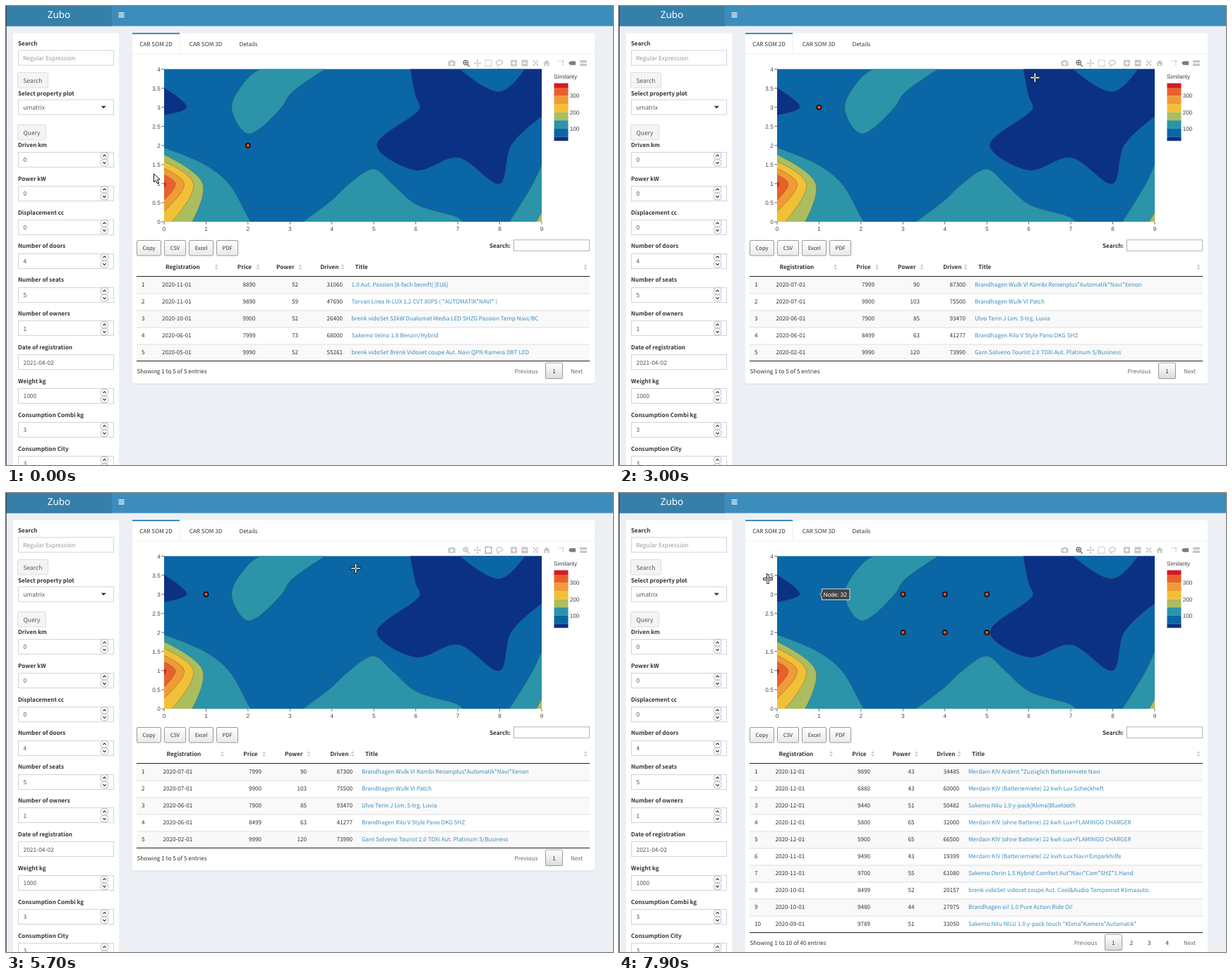
An HTML page that plays this animation: 860 px wide and 651 px high, repeating every 8000 ms.

```html
<!DOCTYPE html>
<html lang="en">
<head>
<meta charset="utf-8">
<title>Car map dashboard</title>
<style>
html, body { margin: 0; height: 100%; overflow: hidden; background: #ecf0f5; }
svg { display: block; }
text { font: 8.13px "Noto Sans CJK JP", "Noto Sans CJK SC", "Noto Sans CJK", "Open Sans", sans-serif;
  fill: #333; text-rendering: geometricPrecision; white-space: pre; }
.bold { font-weight: 700; }
.mid { text-anchor: middle; }
.end { text-anchor: end; }
.input { font-size: 8.45px; fill: #555; }
.hint { fill: #999; }
.button { font-size: 7.5px; }
.link { fill: #3c8dbc; }
.muted { fill: #666; }
.plot { font: 8.2px "Liberation Sans", Arial, sans-serif; fill: #444; }
.light { fill: #fff; }
.brand { font: 13.5px "Noto Sans", sans-serif; fill: #fff; }
</style>
</head>
<body>
<svg id="stage" width="860" height="651" viewBox="0 0 860 651"></svg>
<script>
const LOOP = 8000, STEP = 100;
const text = (x, y, s, cls = "") =>
  `<text x="${x}" y="${y}" class="${cls}">${String(s).replace(/&/g, "&amp;")}</text>`;
const rect = (x, y, w, h, fill, extra = "") =>
  `<rect x="${x}" y="${y}" width="${w}" height="${h}" fill="${fill}" ${extra}/>`;
const path = (d, fill, extra = "") => `<path d="${d}" fill="${fill}" ${extra}/>`;
const at = (x, y, s, extra = "") => `<g transform="translate(${x} ${y})" ${extra}>${s}</g>`;
const range = n => [...Array(n).keys()];
const px = x => 224 + x * 59.44;
const py = y => 306 - y * 54.1;

// ---------- page and sidebar ----------
const field = y => rect(17.5, y, 135, 21, "#fff", 'stroke="#cfd4da"');
const greyButton = (y, w, s) =>
  rect(16.5, y, w, 21.5, "#f4f4f4", 'rx="2" stroke="#ddd"') + text(16.5 + w / 2, y + 14, s, "mid input");

const spinner = at(139.5, 0, [-1, 1].map(d =>
  rect(-5.3, d < 0 ? -9.7 : .3, 10.6, 9.4, "#fff", 'rx="4" stroke="#aaa" stroke-width=".8"') +
  path(`M-2.2 ${d * 4}L0 ${d * 6.2}L2.2 ${d * 4}`, "none", 'stroke="#333" stroke-width="1.2"')).join(""));

const numbers = [["Driven km", 0], ["Power kW", 0], ["Displacement cc", 0], ["Number of doors", 4],
  ["Number of seats", 5], ["Number of owners", 1], ["Date of registration", "2021-04-02"],
  ["Weight kg", 1000], ["Consumption Combi kg", 3], ["Consumption City", 3]];

const page =
  rect(0, 0, 860, 651, "#ecf0f5") +
  rect(0, 0, 860, 28.5, "#3c8dbc") + rect(0, 0, 150, 28.5, "#367fa9") +
  text(75, 16.5, "Zubo", "brand mid") +
  [9.2, 12, 14.8].map(y => rect(159.5, y, 8, 1.4, "#fff")).join("") +
  rect(10, 39, 150, 620, "#d8dce1", 'rx="2"') + rect(10, 38.5, 150, 620, "#fff", 'rx="2"') +
  text(17, 56.3, "Search", "bold") + field(63) + text(24, 77, "Regular Expression", "input hint") +
  greyButton(94.5, 43, "Search") +
  text(17, 126.5, "Select property plot", "bold") + field(133) + text(24.5, 147, "umatrix", "input") +
  path("M134.7 141.7h7l-3.5 3.7z", "#333") +
  greyButton(168.5, 40, "Query") +
  numbers.map(([label, value], i) => {
    const y = 196.3 + i * 47.95;
    return text(17, y + 3.3, label, "bold") + field(Math.round(y + 10.4) + .5) +
      text(24.5, y + 24.5, value, "input") + (value > -1 ? at(0, y + 21, spinner) : "");
  }).join("") +
  rect(0, 0, .8, 651, "#333");

// ---------- table ----------
// cols: registration left, then price, power and driven right edges, title left
const tables = [
  { cols: [221, 353.5, 414, 477, 489.5], total: 5, rows: [
    "2020-11-01;8890;52;31060;1.0 Aut. Passion |8-fach bereift| |EU6|",
    "2020-11-01;9890;59;47690;Torvan Lirea N-LUX 1.2 CVT 80PS ( *AUTOMATIK*NAVI* )",
    "2020-10-01;9900;52;26400;brenk vidoSet 52kW Dualomat Media LED SHZG Passion Temp Navi/BC",
    "2020-06-01;7999;73;68000;Sakemo Velno 1.8 Benzin/Hybrid",
    "2020-05-01;9990;52;55261;brenk vidoSet Brenk Vidoset coupe Aut. Navi QPN Kamera DBT LED"] },
  { cols: [222, 360.5, 423.5, 488, 501], total: 2, rows: [
    "2020-09-01;8600;65;71300;Kelmo Trix 1.3 DXi i-QTAR INA CVT Elegance",
    "2020-04-01;9900;115;73000;Valdorin-Kest K 170 KGI Automatik PureECONOMETRY Avantgarde"] },
  { cols: [222.5, 362, 426, 491, 504], total: 5, rows: [
    "2020-07-01;7999;90;87300;Brandhagen Wulk VI Kombi Reisenplus*Automatik*Navi*Xenon",
    "2020-07-01;9900;103;75500;Brandhagen Wulk VI Patch",
    "2020-06-01;7900;85;93470;Ulvo Terin J Lim. 5-trg. Luvia",
    "2020-06-01;8499;63;41277;Brandhagen Rilo V Style Pano DKG SHZ",
    "2020-02-01;9990;120;73990;Garn Solveno Tourist 2.0 TDXi Aut. Platinum S/Business"] },
  { cols: [221.5, 356, 418.5, 482, 495], total: 40, rows: [
    "2020-12-01;9890;43;34485;Merdain KIV Ardent *Zuzüglich Batteriemiete Navi",
    "2020-12-01;6880;43;60000;Merdain KIV (Batteriemiete) 22 kwh Lux Scheckheft",
    "2020-12-01;9440;51;50482;Sakemo Nilu 1.0 y-pack|Klima|Bluetooth",
    "2020-12-01;5800;65;32000;Merdain KIV (ohne Batterie) 22 kwh Lux+FLAMINGO CHARGER",
    "2020-12-01;5900;65;66500;Merdain KIV (ohne Batterie) 22 kwh Lux+FLAMINGO CHARGER",
    "2020-11-01;9490;43;19399;Merdain KIV (Batteriemiete) 22 kwh Lux Navi+Einparkhilfe",
    "2020-11-01;9700;55;61080;Sakemo Dorin 1.5 Hybrid Comfort Aut*Navi*Cam*SHZ*1.Hand",
    "2020-10-01;8499;52;20157;brenk vidoSet vidoset coupe Aut. Cool&Audio Tempomat Klimaauto.",
    "2020-10-01;9480;44;27975;Brandhagen oi! 1.0 Pure Action Ride Oi!",
    "2020-09-01;9789;51;33050;Sakemo Nilu NILU 1.0 y-pack touch *Klima*Kamera*Automatik*"] }
];
const heads = ["Registration", "Price", "Power", "Driven", "Title"];
const sortIcon = x => at(x, 370, path("M-2.4-.7L0-4 2.4-.7zM-2.4.9L0 4.2 2.4.9z", "#ccc"));
const align = c => c > 0 && c < 4 ? "end" : "";
const rule = (y, color) => rect(185, y, 642, 1, color);

function table({ cols, total, rows }) {
  const bottom = 383.5 + rows.length * 24;
  const pages = Math.ceil(total / 10), first = 776.5 - (pages - 1) * 25.3;
  const height = bottom + 32 - 38.5;
  return rect(179, 39.5, 655, height, "#d8dce1", 'rx="2"') + rect(179, 38.5, 655, height, "#fff", 'rx="2"') +
    heads.map((h, c) => text(cols[c] + (align(c) ? -5.5 : 5), 373.3, h, "bold " + align(c))).join("") +
    [cols[1] - 55.5, cols[1] + 3.5, cols[2] + 3, cols[3], 821].map(sortIcon).join("") +
    rows.map((row, i) => {
      const y = 384 + i * 24;
      return rect(185, y, 642, 24, i % 2 ? "#fff" : "#f9f9f9") + (i ? rule(y - .5, "#ddd") : "") +
        text(192, y + 14.3, i + 1) +
        row.split(";").map((s, c) => text(cols[c], y + 14.3, s, c == 4 ? "link" : align(c))).join("");
    }).join("") +
    rule(383, "#222") + rule(bottom - .5, "#222") +
    text(185.5, bottom + 17, `Showing 1 to ${rows.length} of ${total} entries`) +
    text(first - 39.5, bottom + 17.5, "Previous", "mid muted") +
    rect(first - 12, bottom + 2.5, 24, 22.5, "url(#pager)", 'stroke="#979797" rx="1.5"') +
    range(pages).map(i => text(first + i * 25.3, bottom + 17.5, i + 1, "mid")).join("") +
    text(808.5, bottom + 17.5, "Next", "mid muted");
}

// ---------- contour plot ----------
const [navy, blue, teal, olive, yellow, orange, coral, red] =
  ["#0b3184", "#0a66a5", "#2b94a9", "#abbd5f", "#f2c037", "#f09b36", "#e9602c", "#d01c2a"];

// Centripetal Catmull-Rom handles [towards previous, towards next]
function handles([ax, ay], [bx, by], [cx, cy]) {
  const before = Math.hypot(ax - bx, ay - by), after = Math.hypot(cx - bx, cy - by);
  const p = Math.sqrt(before), q = Math.sqrt(after);
  const nx = after * (ax - bx) - before * (cx - bx), ny = after * (ay - by) - before * (cy - by);
  const inward = 3 * q * (p + q), outward = 3 * p * (p + q);
  return [[bx + nx / inward, by + ny / inward], [bx - nx / outward, by - ny / outward]];
}

// A contour through its grid crossings, closed along the given corners
function contour(fill, crossings, ...corners) {
  const pts = crossings.map(([x, y]) => [px(x), py(y)]);
  const last = pts.length - 1;
  const h = pts.map((p, i) => i && i < last ? handles(pts[i - 1], p, pts[i + 1]) : 0);
  let d = `M${pts[0]}`;
  for (let i = 1; i <= last; i++) {
    const ends = [h[i - 1] && h[i - 1][1], h[i] && h[i][0]].filter(Boolean);
    d += "LQC"[ends.length] + [...ends, pts[i]].join(" ");
  }
  const close = corners.map(([x, y]) => `L${px(x)} ${py(y)}`).join("");
  return path(d + close + "z", fill) + path(d, "none", 'stroke="#444" stroke-width=".35"');
}

const shapes =
  contour(teal, [[2.29, 4], [2, 3.77], [1.61, 3], [2, 2.31], [2.8, 3], [3, 3.34], [3.84, 4]]) +
  contour(navy, [[0, 3.51], [.54, 3], [0, 2.8]]) +
  contour(teal, [[3.31, 0], [4, .57], [4.42, 1], [5, 1.38], [5.43, 1], [6, .46], [7, .11], [7.11, 0]]) +
  contour(teal, [[8.23, 0], [8.79, 1], [9, 1.5]], [9, 0]) +
  contour(olive, [[8.87, 0], [9, .25]], [9, 0]) +
  contour(navy, [[5.87, 4], [6, 3.28], [6.1, 3], [6, 2.85], [5.07, 2], [6, 1.35], [7, 1.68], [8, 1], [8.27, 2], [9, 2.76]], [9, 4]) +
  contour(blue, [[7.05, 4], [8, 3.41], [8.6, 4]]) +
  contour(teal, [[0, 1.94], [1, 1.48], [1.54, 1], [2, .12], [2.06, 0]], [0, 0]) +
  contour(olive, [[0, 1.76], [.92, 1], [.67, 0]], [0, 0]) +
  contour(yellow, [[0, 1.58], [.7, 1], [.19, 0]], [0, 0]) +
  contour(orange, [[0, 1.4], [.48, 1], [0, .27]]) +
  contour(coral, [[0, 1.23], [.27, 1], [0, .57]]) +
  contour(red, [[0, 1.05], [.05, 1], [0, .88]]);

const bands = [red, coral, orange, yellow, olive, teal, blue, navy];
const whiteButton = (x, w, s) =>
  rect(x, 332.5, w, 21.5, "url(#button)", 'stroke="#999" rx="1.5"') + text(x + w / 2, 346, s, "mid button");

const plot =
  rect(179, 67.5, 655, 1, "#f0f0f0") + rect(179, 38, 67, 2, "#3c8dbc") + rect(245.5, 40, 1, 28, "#f0f0f0") +
  text(212.5, 57.3, "CAR SOM 2D", "mid") + text(283, 57.3, "CAR SOM 3D", "mid") + text(343.5, 57.3, "Details", "mid") +
  rect(224, 89.5, 535, 216.5, blue) + shapes +
  range(10).map(i => rect(px(i) - .4, 306, .8, 3.6, "#444") + text(px(i), 319.4, i, "plot mid")).join("") +
  range(9).map(i => rect(220.2, py(i / 2) - .4, 3.8, .8, "#444") + text(218.7, py(i / 2) + 2.9, i / 2, "plot end")).join("") +
  text(776, 103.3, "Similarity", "plot") +
  bands.map((c, i) => {
    const top = i ? 104.4 + i * 11.57 : 109.5;
    return rect(776.5, top, 20, Math.min(116 + i * 11.57, 191.3) - top, c);
  }).join("") +
  [300, 200, 100].map((v, i) => text(798.7, 130.3 + i * 23.2, v, "plot")).join("") +
  whiteButton(185.5, 34, "Copy") + whiteButton(224.5, 30, "CSV") +
  whiteButton(259.5, 34, "Excel") + whiteButton(298.5, 30, "PDF") +
  text(715, 343, "Search:", "bold end") + rect(719.5, 331.8, 107, 15.5, "#fff", 'stroke="#aaa" stroke-width=".9"');

// ---------- toolbar ----------
const solid = d => path(d, "currentColor", 'fill-rule="evenodd"');
const line = (d, w = 1.3, extra = "") => path(d, "none", `stroke="currentColor" stroke-width="${w}" ${extra}`);
const square = "M-3.5-4.5h7q1 0 1 1v7q0 1-1 1h-7q-1 0-1-1v-7q0-1 1-1z";
const arrows = "M0-5.2l2 2.2h-4zM0 5.2l2-2.2h-4zM-5.2 0l2.2-2v4zM5.2 0l-2.2-2v4z";
const tools = [
  [631.5, "Download plot as a png", solid("M-5-3h2.3l1-1.3h3.4l1 1.3h2.3v7h-10zM0-1.8a2.3 2.3 0 1 0 .01 0z")],
  [652, "Zoom", line("M-.7-4a3.3 3.3 0 1 0 .01 0zM1.7 1.9L4.8 5M-2.5-.7h3.6M-.7-2.5v3.6", 1.6)],
  [668, "Pan", solid(arrows) + line("M-4 0h8M0-4v8", 1)],
  [683.5, "Box Select", line("M-4.3-4.3h8.6v8.6h-8.6z", 1.3, 'stroke-dasharray="1.5 .8"')],
  [699, "Lasso Select", line("M-3 2C-6 0-4-4 0-4S6-1.5 3.5.8S-2 2.8-3 2.4c1.4 1 1.2 1.8.2 2.6")],
  [719.5, "Zoom in", solid(square + "M-.7-3v2.3H-3v1.4h2.3V3h1.4V.7H3V-.7H.7V-3z")],
  [735, "Zoom out", solid(square + "M-3-.7v1.4h6v-1.4z")],
  [750.5, "Autoscale", at(0, 0, solid(arrows) + line("M-3.5 0h7M0-3.5v7", 1), 'style="rotate:45deg"')],
  [766, "Reset axes", solid("M-5 .3L0-4.5 5 .3H3.5V4.2h-2.4V1.2h-2.2v3h-2.4V.3z")],
  [786, "Toggle Spike Lines", line("M-4-3h6M3-2v6", 1.2, 'stroke-dasharray="2 1"') + solid("M2-4h2v2h-2z")],
  [802, "Show closest data on hover", solid("M-5 0l2.5-2.8h7.5v5.6h-7.5z")],
  [818, "Compare data on hover", solid("M-5-4h10v3.2h-10zM-5 .8h10V4h-10z")]
];

const tooltip = (x, name) => {
  const w = 18 + 3.25 * name.length;
  return path(`M${x - 3} 91.5l3-3 3 3z`, "#69738a") + rect(x + 11 - w, 91, w, 17, "#69738a", 'rx="1.5"') +
    text(x + 11 - w / 2, 102.6, name, "plot light mid");
};

function toolbar(t, hovered) {
  const active = t < 4100 || t >= 6700 ? "Zoom" : t < 5300 ? "Lasso Select" : "Box Select";
  const fade = (from, ms) => (t - from) / ms;
  const opacity = t < 1100 ? 1 : t < 2000 ? fade(1100, 450) : t < 6700 ? fade(2000, 450) : fade(7600, 300);
  return `<g color="#444" opacity="${Math.max(0, Math.min(1, opacity))}">` + tools.map(tool => {
    const strong = tool[1] == active || tool == hovered || tool[0] == 802;
    return at(tool[0], 81, tool[2], `opacity="${strong ? .7 : .3}"`);
  }).join("") + "</g>" + (hovered ? tooltip(hovered[0], hovered[1]) : "");
}

// ---------- pointer, markers, selection ----------
const route = [[0, 209.5, 238], [100, 222, 229], [200, 222, 229], [300, 226, 197], [400, 234, 205], [700, 286, 257],
  [900, 286, 257], [1300, 311, 260], [1800, 285, 145], [2000, 285, 145], [2200, 297, 146], [2600, 298, 147],
  [3200, 735, 79], [3500, 692, 76], [3700, 694, 74], [4000, 694, 74], [4400, 358, 140], [4800, 654, 77],
  [4900, 654, 77], [5200, 683, 76], [5400, 683, 76], [5800, 433, 117], [5900, 408, 131], [6300, 532, 196.5],
  [7000, 532, 196.5], [7500, 271, 142], [7600, 271, 142], [7900, 211, 122], [8000, 211, 122]];

function pointerAt(t) {
  const i = route.findIndex(k => k[0] > t);
  const [t0, x0, y0] = route[i - 1], [t1, x1, y1] = route[i];
  const u = (t - t0) / (t1 - t0);
  return [x0 + (x1 - x0) * u, y0 + (y1 - y0) * u];
}

const outlined = 'stroke="#111" stroke-width="1" stroke-linejoin="round"';
const arrow = path("M0 0V11.8L2.8 9.2 5 14 7 13.1 4.9 8.4 8.6 8.1z", "#fff", outlined);
const hand = path("M-1.5 1Q0-2 1.5 1V4.5L8 6Q9 6.5 8.8 8L7.5 13H0L-4 8Q-4 0-1.5 7z", "#fff", outlined);
const cross = path("M-7 0H7M0-7V7", "none", 'stroke="#111" stroke-width="3.4"') +
  path("M-6.3 0H6.3M0-6.3V6.3", "none", 'stroke="#fff" stroke-width="1.7"') + rect(-.7, -.7, 1.4, 1.4, "#111");

const dot = ([x, y]) => `<circle cx="${px(x)}" cy="${py(y)}" r="3.1" fill="#fb4a0c" stroke="#000" stroke-width="1.4"/>`;
const nodeLabel = (x, y) => at(px(x), py(y),
  path("M1.5 0L4-3V-7.7H43.5V7.7H4V3z", "#444", 'stroke="#fff" stroke-width=".8"') +
  text(6.3, 2.9, `Node: ${y * 10 + x + 1}`, "plot light"));

// [from, to, x, y]
const hovers = [[600, 1000, 1, 1], [1700, 2000, 1, 3], [4400, 4500, 2, 3], [7400, 8000, 1, 3]];
const marked = t => t < 1100 ? [[2, 2]] : t < 2000 ? [[1, 1]] : t < 6700 ? [[1, 3]]
  : range(6).map(i => [3 + i % 3, 3 - Math.floor(i / 3)]);

function selection(x, y) {
  const d = `M408.5 131.5H${x}V${y}H408.5z`;
  return path(d, "none", 'stroke="#fff"') + path(d, "none", 'stroke="#222" stroke-dasharray="1.4 1.4"');
}

function live(t) {
  const [x, y] = pointerAt(t);
  const hovered = y < 86 && tools.find(tool => Math.abs(tool[0] - x) < 8);
  const dragging = t >= 6000 && t < 6700;
  return `<g opacity="${dragging ? .3 : 1}">${marked(t).map(dot).join("")}</g>` +
    hovers.filter(h => t >= h[0] && t < h[1]).map(h => nodeLabel(h[2], h[3])).join("") +
    (dragging ? selection(x, y) : "") + toolbar(t, hovered) +
    at(x, y, t < 100 ? arrow : y < 88 ? hand : cross);
}

// ---------- loop ----------
const gradient = (id, end) => `<linearGradient id="${id}" x2="0" y2="1"><stop stop-color="#fff"/><stop offset="1" stop-color="${end}"/></linearGradient>`;
const defs = `<defs>${gradient("button", "#e9e9e9")}${gradient("pager", "#dcdcdc")}</defs>`;
const stage = document.getElementById("stage");
let shown = -1;

function draw(now) {
  const t = Math.floor(now % LOOP / STEP) * STEP;
  if (t !== shown) {
    shown = t;
    const data = tables[t < 1100 ? 0 : t < 2000 ? 1 : t < 6700 ? 2 : 3];
    stage.innerHTML = defs + page + table(data) + plot + live(t);
  }
  requestAnimationFrame(draw);
}
draw(performance.now());
</script>
</body>
</html>
```
